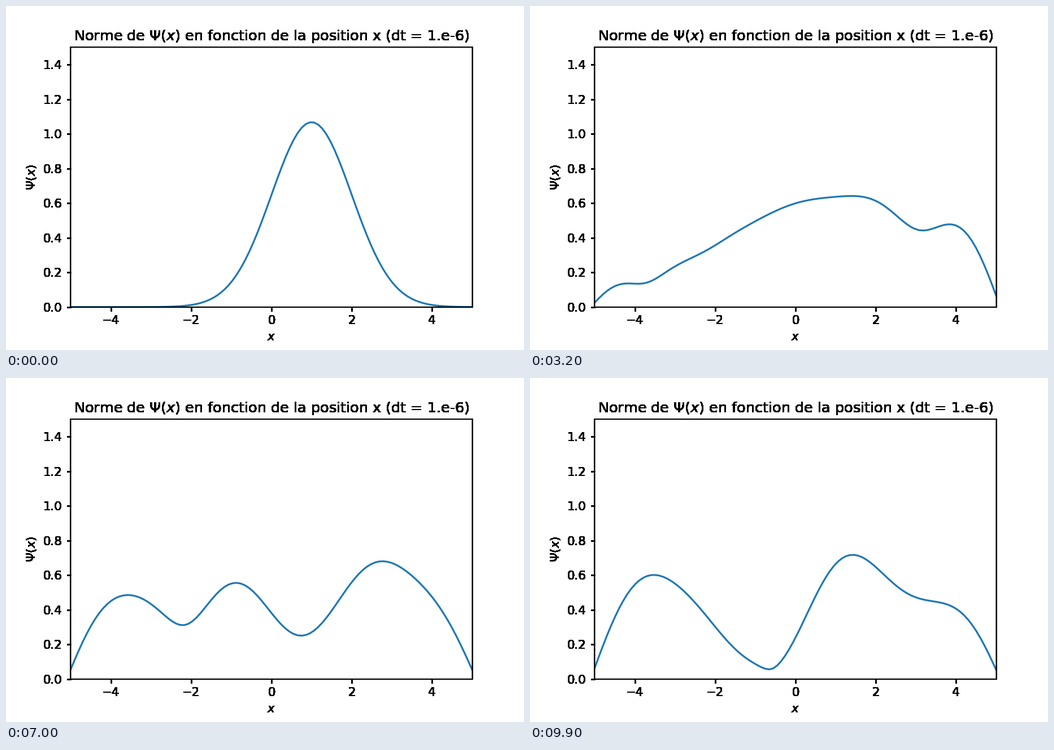
A matplotlib script for the animation above (10000 ms loop, 917 px wide and 611 px high).

```python
import numpy as np
import matplotlib.pyplot as plt
from matplotlib.animation import FuncAnimation

DPI = 917 / 6
FRAMES = 100
INTERVAL = 100  # ms
STEP = 0.08     # physical time between two frames

# Particle in a box, hbar = m = 1, walls one cell outside the grid
N = 100
dx = 10 / N
x = np.linspace(-5, 5, N)

# Eigenmodes and energies of the finite-difference Hamiltonian
n = np.arange(1, N + 1)
modes = np.sqrt(2 / (N + 1)) * np.sin(np.pi * np.outer(n, n) / (N + 1))
energy = (1 - np.cos(np.pi * n / (N + 1))) / dx**2

psi0 = np.exp(-(x - 1) ** 2 / 2)
psi0 *= np.sqrt(2 / np.sum(psi0**2 * dx))
coeffs = modes.T @ psi0


def norm_at(t):
    return np.abs(modes @ (coeffs * np.exp(-1j * energy * t)))


def drop_alpha(img, dpi):
    """Make every touched pixel opaque: heavy, hard-edged text and frame."""
    img = img.copy()
    img[..., 3] = img[..., 3] > 0
    return img, 0, 0


plt.rcParams["path.snap"] = False

# The tiny margin keeps the pixel height from rounding down
fig, ax = plt.subplots(figsize=(6, 611 / DPI + 1e-9), dpi=DPI)
fig.subplots_adjust(left=0.125, right=0.9, bottom=0.125, top=0.88)
ax.set(xlim=(-5, 5), ylim=(0, 1.5), xlabel="$x$", ylabel=r"$\Psi(x)$")
ax.set_title(r"Norme de $\Psi(x)$ en fonction de la position x (dt = 1.e-6)")
ax.tick_params(width=1.2)
ax.set_agg_filter(drop_alpha)
line, = ax.plot(x, norm_at(0))


def update(i):
    line.set_ydata(norm_at(i * STEP))
    return line,


anim = FuncAnimation(fig, update, frames=FRAMES, interval=INTERVAL,
                     repeat=True, repeat_delay=0)
plt.show()
```
